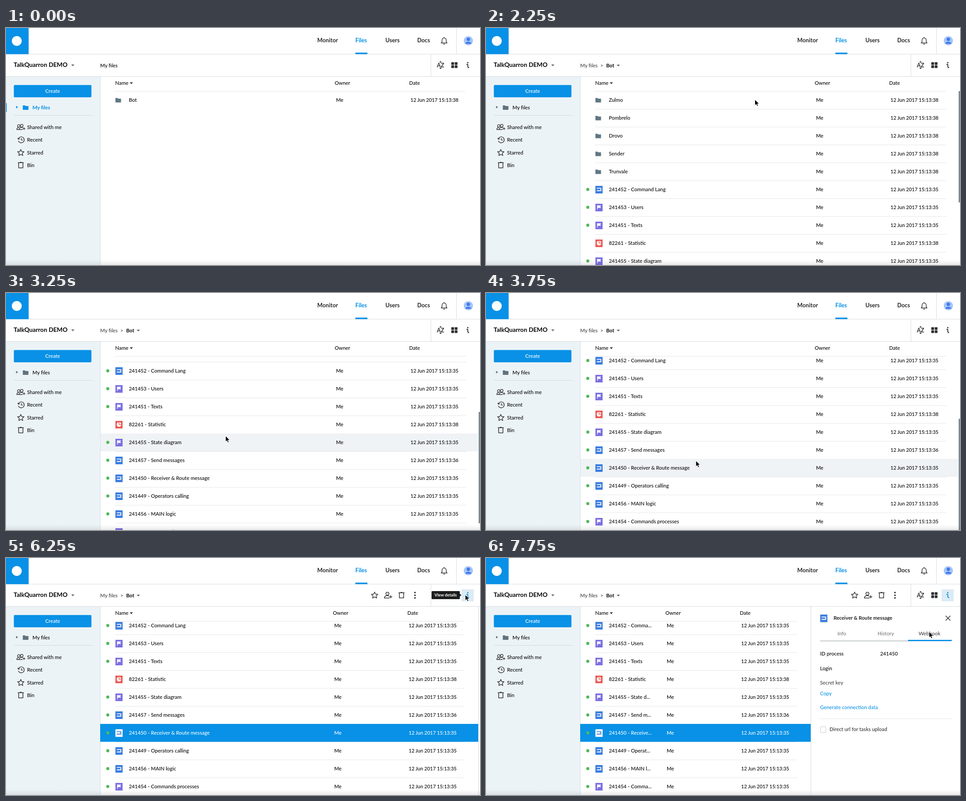
An HTML page that plays this animation: 1057x530 px, repeating every 8 s.

```html
<!DOCTYPE html>
<html lang="en">
<head>
<meta charset="utf-8">
<title>File manager</title>
<style>
html, body { margin: 0; width: 100%; height: 100%; overflow: hidden; background: #fff; }
svg { display: block; width: 1057px; height: 530px; }
text { font: 500 11.3px Lato, "Noto Sans", sans-serif; fill: #080808; white-space: pre; }
.b { font-weight: 700; }
.nav { font-weight: 700; font-size: 12.7px; fill: #2c2c2c; }
.title { font-weight: 700; font-size: 13.6px; }
.head { font-weight: 700; font-size: 11.2px; }
.tip { font-weight: 700; font-size: 9.2px; fill: #fff; }
.date { font-size: 11px; }
</style>
</head>
<body>
<svg viewBox="0 0 1057 530" xmlns="http://www.w3.org/2000/svg">
  <defs>
    <clipPath id="list"><rect x="210" y="141" width="847" height="389"/></clipPath>
    <linearGradient id="shade" x1="0" y1="0" x2="0" y2="1">
      <stop offset="0" stop-color="#000" stop-opacity="0"/>
      <stop offset="1" stop-color="#000" stop-opacity=".08"/>
    </linearGradient>
  </defs>
  <g id="base"></g>
  <g id="view"></g>
  <rect y="518" width="1057" height="12" fill="url(#shade)"/>
  <g id="cursor"><path d="M0 0V13.2L3.1 10.4L5.2 15L7.5 14L5.5 9.5H9.6Z" fill="#000" stroke="#fff" stroke-width="1"/></g>
</svg>
<script>
const BLUE = '#0891e6', INK = '#2e2e2e', LINE = '#e3e7e9';
const STEP = 250, LOOP = 8000;
const get = id => document.getElementById(id);

const rect = (x, y, w, h, fill, extra = '') =>
  `<rect x="${x}" y="${y}" width="${w}" height="${h}" fill="${fill}" ${extra}/>`;
const circle = (x, y, r, fill, extra = '') => `<circle cx="${x}" cy="${y}" r="${r}" fill="${fill}" ${extra}/>`;
const path = (d, fill, extra = '') => `<path d="${d}" fill="${fill}" ${extra}/>`;
const stroke = (d, color = INK, w = 1.5) =>
  `<path d="${d}" fill="none" stroke="${color}" stroke-width="${w}" stroke-linejoin="round"/>`;
const text = (x, y, s, cls = '', fill = '', anchor = 'start') =>
  `<text x="${x}" y="${y}" class="${cls}" text-anchor="${anchor}" ${fill && `style="fill:${fill}"`}>${s.replace('&', '&amp;')}</text>`;
const at = (x, y, body) => `<g transform="translate(${x} ${y})">${body}</g>`;

// Icons, drawn around their centre
const caret = (x, y, color = INK) => path(`M${x - 3.5} ${y - 2}h7l-3.5 4z`, color);
const folder = (x, y, fill) => at(x, y, path('M-6 -5H-1.5L0 -3.5H6.5V5H-6Z', fill));
const star = (x, y) => {
  const pts = [...Array(10)].map((_, i) => {
    const r = i % 2 ? 3.5 : 7.6, a = i * Math.PI / 5;
    return `${(r * Math.sin(a)).toFixed(2)} ${(0.6 - r * Math.cos(a)).toFixed(2)}`;
  });
  return at(x, y, stroke(`M${pts.join('L')}Z`, INK, 1.4));
};
const bin = (x, y) => at(x, y, stroke('M-4.7 -4.5V6.3H4.7V-4.5M-6.7 -5.2H6.7M-2 -6.3H2'));
const person = (x, y) => at(x, y,
  circle(-1.5, -3.2, 3.4, 'none', `stroke="${INK}" stroke-width="1.5"`) +
  stroke('M3.5 6.5H-8.3C-8.3 2.5 -5.5 1.2 -1.5 1.2C.3 1.2 1.8 1.5 2.8 2.1M6 .5V7M2.8 3.7H9.2'));
const people = (x, y) => at(x, y,
  circle(-4.6, -2.6, 2.8, 'none', `stroke="${INK}" stroke-width="1.3"`) +
  circle(2, -3, 3.1, 'none', `stroke="${INK}" stroke-width="1.3"`) +
  stroke('M-4 5.5H-9C-9 2.3 -7.2 1.2 -4.6 1.2M4 5.5H-4C-4 2 -1 .9 2 .9C3.2 .9 4.2 1.2 5 1.7M7.2 .8V6.6M4.2 3.7H10.2', INK, 1.3));
const clock = (x, y) => at(x, y, stroke('M-6.2 -2.5A6.7 6.7 0 1 1 -6.3 2.4M-8 -4.2L-6.2 -1.2L-3.2 -2.5M.3 -3.6V.6H3.8', INK, 1.4));
const bell = (x, y) => at(x, y,
  stroke('M-6.5 4.5H6.5L4.6 2V-2C4.6 -8.2 -4.6 -8.2 -4.6 -2V2Z', INK, 1.4) + stroke('M0 -6.5V-8.2M-1.8 7H1.8', INK, 1.6));
const info = (x, y, color) => at(x, y,
  circle(0.3, -5.4, 1.5, color) + stroke('M-3 -1.6H.3V3.2C.3 5.5 2 5.8 3.2 5.1', color, 1.9));
const grid = (x, y) => [-7, 0.6].map(dx => [-6.5, 0.6].map(dy => rect(x + dx, y + dy, 6.2, 5.9, INK, 'rx=".8"')).join('')).join('');
const sort = (x, y) => text(x, y + 4.5, 'AZ', 'nav', INK, 'middle') +
  path(`M${x - 2.8} ${y - 6}h5.6l-2.8 -3zM${x - 2.8} ${y + 6}h5.6l-2.8 3z`, INK);

const glyphs = {
  proc: ['#3b7de0', c => stroke('M-5 -2.6H4.2V2.8H-5', c, 1.9)],
  flag: ['#7b70e2', c => stroke('M-3.6 -4.5V5', c, 1.4) + path('M-3 -4.3H4.6L2.8 -1.5L4.6 1.2H-3Z', c)],
  pie: ['#ec5b57', (c, bg) => circle(0, 0, 5.2, c) + stroke('M0 -5.5V0H5.5', bg, 1.4)]
};
function fileIcon(x, y, type, inverted) {
  const [color, glyph] = glyphs[type];
  const [bg, fg] = inverted ? ['#fff', color] : [color, '#fff'];
  return at(x, y, rect(-8, -8, 16, 17, bg) + glyph(fg, bg));
}

// name, type, seconds, live dot, length when shortened
const files = [
  ['Zulmo', 'dir', 38], ['Pombrelo', 'dir', 38], ['Drovo', 'dir', 38], ['Sender', 'dir', 38], ['Trunvale', 'dir', 38],
  ['241452 - Command Lang', 'proc', 35, 1, 14],
  ['241453 - Users', 'flag', 35, 1],
  ['241451 - Texts', 'flag', 35, 1],
  ['82261 - Statistic', 'pie', 38],
  ['241455 - State diagram', 'flag', 35, 1, 16],
  ['241457 - Send messages', 'proc', 36, 1, 15],
  ['241450 - Receiver & Route message', 'proc', 35, 1, 16],
  ['241449 - Operators calling', 'proc', 35, 1, 15],
  ['241456 - MAIN logic', 'proc', 35, 1, 15],
  ['241454 - Commands processes', 'flag', 35, 1, 14]
];
const root = [['Bot', 'dir', 38]];

// Values hold from the given step until the next entry
const cursors = [[0, null], [2, [760, 470]], [3, [690, 330]], [4, [630, 210]], [5, [602, 164]], [6, [601, 160]],
  [9, [599.5, 160]], [10, [575, 196]], [11, [530, 270]], [12, [500, 308]], [13, [489.5, 319.5]],
  [14, [485, 335]], [15, [468, 375]], [16, [452, 412]], [17, [446, 420]], [18, [446.5, 402]], [19, [446.5, 397]],
  [21, [620, 300]], [22, [850, 170]], [23, [1000, 95]], [24, [1024, 82]], [27, [1020, 100]], [28, [1003, 138]], [29, [988, 165]]];
const scrolls = [[0, 0], [12, 70], [13, 187], [14, 210]];
const selections = [[0, -1], [6, 0], [8, -1], [19, 11]];
const hovers = [[0, -1], [5, 0], [6, -1], [12, 8], [13, 9], [14, 10], [15, 11], [16, 12], [18, 11], [19, -1]];
const edges = [[0, 1057], [25, 1053], [26, 724]];
const pick = (table, k) => table.filter(e => e[0] <= k).pop()[1];

function drawBase() {
  get('base').innerHTML =
    rect(0, 109, 210, 421, '#ecf3f7') + rect(210, 109, 1, 421, '#d8e0e4') +
    rect(0, 58, 1057, 1, '#dcdfe1') + rect(0, 108, 1057, 1, '#d5d9db') +
    rect(0, 0, 50.5, 58.5, BLUE) + circle(24, 29, 11, '#fff') +
    [[694, 'Monitor'], [779, 'Files', BLUE], [846, 'Users'], [917, 'Docs']].map(([x, s, c]) => text(x, 32, s, 'nav', c)).join('') +
    rect(779, 55, 27, 3.5, BLUE) + bell(977, 29) + rect(1004, 0, 1, 58, '#d8dbdd') + rect(947, 59, 1, 49, '#d8dbdd') +
    circle(1031, 28.5, 10.3, '#a6c4fb') + circle(1031, 25.3, 3.7, '#3b78e7') + path('M1024.3 35.2C1024.3 29.5 1037.7 29.5 1037.7 35.2Z', '#3b78e7') +
    text(17, 87, 'TalkQuarron DEMO', 'title') + caret(149, 83.5, '#666') +
    rect(17.5, 127.5, 173, 27.5, BLUE, 'rx="2"') + text(104, 144.5, 'Create', '', '#fff', 'middle') +
    rect(17, 195, 177, 1, '#d3dade') +
    people(33, 221.5) + clock(34, 250) + star(33, 278.5) + bin(33, 306.5) +
    ['Shared with me', 'Recent', 'Starred', 'Bin'].map((s, i) => text(47, 226 + i * 28.3, s)).join('');
}

function drawRow(row, top, o) {
  const [name, type, sec, live, cut] = row;
  const y = top + 20, base = top + 24, ink = o.selected ? '#fff' : '';
  const label = o.narrow && cut ? name.slice(0, cut) + '...' : name;
  return rect(243, top + 40, o.edge - 273, 1, o.lines ? LINE : 'none') +
    (o.selected ? rect(210, top, o.end - 210, 40, BLUE) : o.hover ? rect(211, top, o.end - 211, 40, o.hover) : '') +
    (live ? circle(227, y, 3.4, '#50b855') : '') +
    (type === 'dir' ? folder(250, y + .5, ink || '#607784') : fileIcon(252, y, type, o.selected)) +
    text(274, base, label, '', ink) + text(o.edge - 321, base, 'Me', '', ink) +
    text(o.edge - 155, base, `12 Jun 2017 15:13:${sec}`, 'date', ink);
}

function drawList(k, edge) {
  const opened = k >= 8, scroll = pick(scrolls, k), sel = pick(selections, k), hover = pick(hovers, k);
  const end = opened ? Math.min(edge, 1053) : 1057;
  const rows = (opened ? files : root).map((row, i) => drawRow(row, 141 + 40 * i - scroll, {
    edge, end, lines: opened, narrow: edge < 1000, selected: i === sel,
    hover: i === hover ? '#eff3f5' : k === 19 && i === 12 ? '#f8f9fb' : ''
  }));
  const after = k === 6 ? rect(211, 181, 846, 13.5, '#f3f6f8') : '';
  return text(243.5, 126.5, 'Name') + caret(279.5, 123.5) +
    text(edge - 324, 126.5, 'Owner') + text(edge - 158, 126.5, 'Date') +
    rect(243, 141, edge - (opened ? 273 : 276), 1, LINE) +
    `<g clip-path="url(#list)">${after}${rows.join('')}</g>` +
    (opened && edge === 1057 ? rect(1054, 141 + scroll * .668, 3, 249, '#7c8a93') : '');
}

function drawBar(k) {
  const opened = k >= 8, active = k >= 24, tip = k >= 24 && k < 27;
  const crumb = opened
    ? text(210, 87.5, 'My files', '', '#444') + text(255, 87.5, '>', '', '#444') + text(268, 87.5, 'Bot', 'b') + caret(295, 84, '#666')
    : text(210, 87.5, 'My files');
  const side = opened ? '#5f737d' : BLUE;
  const tools = star(822, 83) + person(852, 83) + bin(882, 83) + [77.3, 83.3, 89.3].map(y => circle(912, y, 1.8, INK)).join('');
  return crumb +
    (opened ? '' : rect(0, 168, 1.5, 20, BLUE)) +
    path('M22.5 174l4.5 3l-4.5 3z', side) + folder(43.5, 178, side) +
    text(59, 181.5, 'My files', opened ? '' : 'b', opened ? '' : BLUE) +
    (pick(selections, k) >= 0 ? tools : '') +
    (active ? rect(1016, 70, 27, 27, '#dcebf4', 'rx="1"') : '') + info(1029.5, 83, active ? BLUE : INK) +
    (tip
      ? path('M950.5 74H1010.5Q1012 74 1012 75.5V80L1015.5 83L1012 86V90.5Q1012 92 1010.5 92H950.5Q949 92 949 90.5V75.5Q949 74 950.5 74Z', '#1c1c1c') +
        text(980.5, 86.3, 'View details', 'tip', '', 'middle')
      : sort(969, 83) + grid(1000, 83));
}

function drawPanel(k, edge) {
  if (edge > 1053) return '';
  const frame = rect(edge, 109, 1057 - edge, 421, '#fff') + rect(edge, 109, 1, 421, '#d3d9dd');
  if (edge > 1000) return frame;
  const hook = k >= 30, tab = hook ? 2 : 0;
  const tabs = [[793.5, 'Info'], [891.5, 'History'], [989, 'Webhook']]
    .map(([x, s], i) => text(x, 173, s, '', i === tab ? '#444' : '#7a7a7a', 'middle')).join('');
  const body = text(745, 218, 'ID process') + text(879, 218, '241450') +
    text(745, 250.5, 'Login') + text(745, 283, 'Secret key', '', '#444') +
    text(745, 306.5, 'Copy', '', BLUE) + text(745, 338, 'Generate connection data', '', BLUE) +
    rect(745, 359, 296, 1, LINE) +
    rect(745.5, 377.5, 12.5, 12.5, '#fff', 'stroke="#c5c9cc" rx="1"') + text(766, 387, 'Direct url for tasks upload', '', '#333');
  return frame + fileIcon(753.3, 134.5, 'proc') + text(775, 138, 'Receiver & Route message', 'head', '#222') +
    stroke('M1025 129.2L1035.6 139.8M1035.6 129.2L1025 139.8', INK, 1.5) +
    tabs + rect(745, 185, 293, 1, '#8d969b') + rect(745 + 98 * tab, 183, 97.5, 3, BLUE) +
    (hook ? body : '');
}

let shown = -1;
function tick(now) {
  const k = Math.floor(now % LOOP / STEP);
  if (k !== shown) {
    shown = k;
    const edge = pick(edges, k), pos = pick(cursors, k), cursor = get('cursor');
    get('view').innerHTML = drawBar(k) + drawList(k, edge) + drawPanel(k, edge);
    cursor.style.display = pos ? '' : 'none';
    if (pos) cursor.setAttribute('transform', `translate(${pos})`);
  }
}

drawBase();
const start = performance.now();
function loop() {
  tick(performance.now() - start);
  requestAnimationFrame(loop);
}
loop();
</script>
</body>
</html>
```
